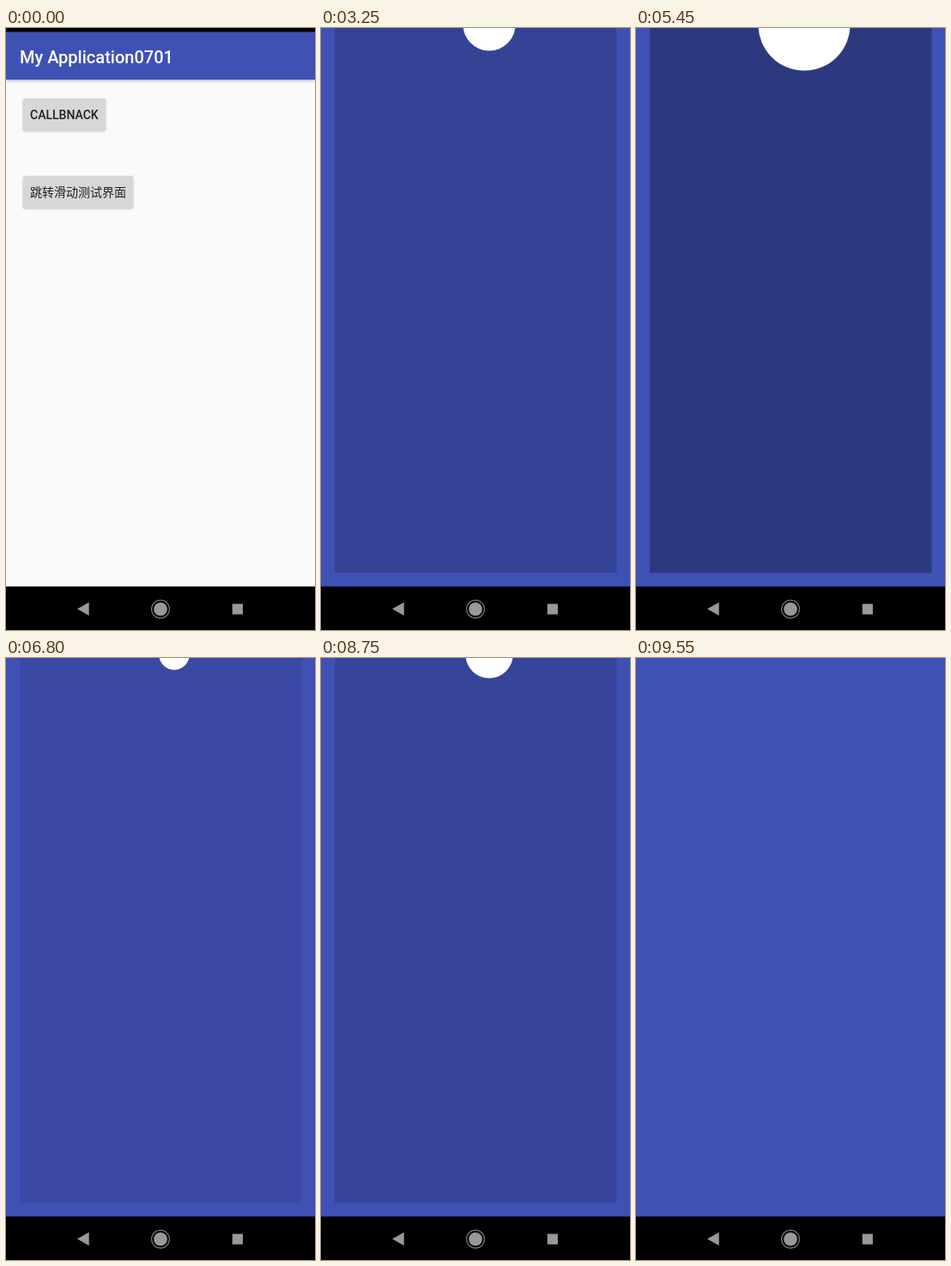
An HTML page with a canvas that plays this animation: 360 px wide and 700 px high, repeating every 9600 ms.

```html
<!DOCTYPE html>
<html lang="zh-CN">
<head>
<meta charset="utf-8">
<title>Pull animation</title>
<style>
html, body { margin: 0; width: 100%; height: 100%; overflow: hidden; background: #000; }
canvas { display: block; width: 360px; height: 700px; }
</style>
</head>
<body>
<canvas id="stage" width="360" height="700"></canvas>
<script>
const ctx = document.getElementById('stage').getContext('2d');
const LOOP = 9600, STEP = 50, RELEASE = 300;
const WIDTH = 360, NAV_TOP = 649.4;
const PANEL = [16.1, 0, 328.3, 633.4];
const BLUE = '#4051b5';
const TITLE_FONT = '500 20px Roboto, sans-serif';
const LABEL_FONT = '500 14px Roboto, sans-serif';
const CJK_FONT = '400 14px "Noto Sans CJK SC", "Noto Sans CJK", sans-serif';

// Each pull grows from one radius to another, then springs back.
const pulls = [
  { start: 3250, release: 4200, from: 30.5, to: 281.2, power: 1.3 },
  { start: 5000, release: 6550, from: 28, to: 265, power: 1.8 },
  { start: 7350, release: 8000, from: 28, to: 108.7, power: 1 },
  { start: 8750, release: 9250, from: 27.6, to: 150, power: 1.2 }
];

const clamp = v => Math.max(0, Math.min(1, v));
const progress = (t, start, end) => clamp((t - start) / (end - start));
const easeInOut = p => (1 - Math.cos(Math.PI * p)) / 2;
const easeOut = p => 1 - (1 - p) ** 4;

function rect(x, y, w, h, color) {
  ctx.fillStyle = color;
  ctx.fillRect(x, y, w, h);
}

function disc(x, y, r, color) {
  ctx.fillStyle = color;
  ctx.beginPath();
  ctx.arc(x, y, r, 0, Math.PI * 2);
  ctx.fill();
}

function text(str, x, y, font, color) {
  ctx.font = font;
  ctx.fillStyle = color;
  ctx.fillText(str, x, y);
}

function withShadow(blur, offset, alpha, draw) {
  ctx.save();
  ctx.shadowColor = `rgba(0,0,0,${alpha})`;
  ctx.shadowBlur = blur;
  ctx.shadowOffsetY = offset;
  draw();
  ctx.restore();
}

function button(x, y, w, h, label, font, baseline, ripple = 0) {
  const shape = new Path2D();
  shape.roundRect(x, y, w, h, 2);
  withShadow(3, 1, 0.25, () => {
    ctx.fillStyle = '#d6d7d7';
    ctx.fill(shape);
  });
  if (ripple > 0) {
    ctx.save();
    ctx.clip(shape);
    disc(x + w / 2, y + h / 2, 20 + ripple * 60, 'rgba(0,0,0,0.12)');
    ctx.restore();
  }
  text(label, x + 8, baseline, font, '#202020');
}

function drawHome(t) {
  rect(0, 0, WIDTH, 700, '#fafafa');
  withShadow(4, 1, 0.35, () => rect(0, 4, WIDTH, 56, BLUE));
  rect(0, 0, WIDTH, 4.5, '#000');
  text('My Application0701', 16, 41, TITLE_FONT, '#fff');
  button(20, 82, 96, 37, 'CALLBNACK', LABEL_FONT, 106);
  button(20, 172, 128, 37, '跳转滑动测试界面', CJK_FONT, 196, progress(t, 1050, 1400));
}

function drawReveal(t) {
  const p = easeOut(progress(t, 1400, 2050));
  const top = NAV_TOP * (1 - p);
  rect(0, 0, WIDTH, 700, `rgba(0,0,0,${0.1 * p})`);
  rect(0, top, WIDTH, 700 - top, BLUE);
  rect(0, 0, WIDTH, 3, '#000');
}

function pullRadius(t) {
  const pull = pulls.find(p => t >= p.start && t < p.release + RELEASE);
  if (!pull) return 0;
  const { start, release, from, to, power } = pull;
  if (t <= release) return from + (to - from) * progress(t, start, release) ** power;
  return to * (1 - easeInOut(progress(t, release, release + RELEASE)));
}

function drawPull(t) {
  rect(0, 0, WIDTH, 700, BLUE);
  const r = pullRadius(t);
  if (r <= 0) return;
  ctx.save();
  ctx.beginPath();
  ctx.rect(...PANEL);
  ctx.clip();
  rect(0, 0, WIDTH, 700, `rgba(0,0,0,${clamp(r / 177)})`);
  disc(196, -4, r, '#fff');
  ctx.restore();
}

function drawNav() {
  const gray = '#999';
  rect(0, NAV_TOP, WIDTH, 700 - NAV_TOP, '#000');
  ctx.fillStyle = gray;
  ctx.beginPath();
  ctx.moveTo(83, 675.5);
  ctx.lineTo(96.7, 667.8);
  ctx.lineTo(96.7, 683.2);
  ctx.fill();
  disc(180, 675.7, 7.8, gray);
  ctx.strokeStyle = '#808080';
  ctx.lineWidth = 1.1;
  ctx.beginPath();
  ctx.arc(180, 675.7, 10.4, 0, Math.PI * 2);
  ctx.stroke();
  rect(263.7, 669.6, 12.2, 12.2, gray);
}

function frame(now) {
  const t = Math.floor((now % LOOP) / STEP) * STEP;
  if (t < 2100) {
    drawHome(t);
    if (t > 1400) drawReveal(t);
  } else {
    drawPull(t);
  }
  drawNav();
  requestAnimationFrame(() => frame(performance.now() - origin));
}

const origin = performance.now();
frame(0);
</script>
</body>
</html>
```
